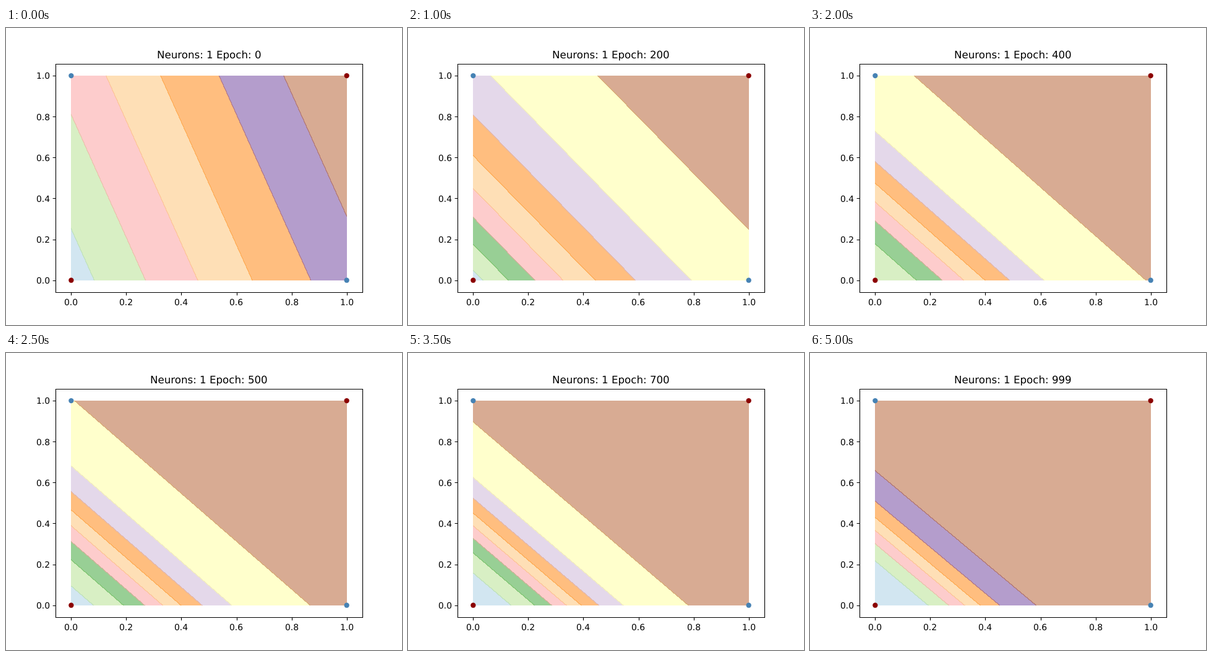
These frames come from a looping animation (640 by 480 pixels, 5500 ms). An HTML page with a canvas:

```html
<!DOCTYPE html>
<html lang="en">
<head>
<meta charset="utf-8">
<title>Decision surface</title>
<style>
html, body { margin: 0; width: 100%; height: 100%; overflow: hidden; background: #fff; }
canvas, svg { position: absolute; left: 0; top: 0; display: block; }
text { font: 13.89px "DejaVu Sans", sans-serif; fill: #000; text-rendering: geometricPrecision; }
#title { font-size: 16.67px; }
</style>
</head>
<body>
<canvas id="field" width="640" height="480"></canvas>
<svg id="plot" width="640" height="480" viewBox="0 0 640 480">
  <text id="title" y="49"></text>
</svg>
<script>
const STEP = 500, STEPS = 11;
const X0 = 105.35, XS = 445.3, Y0 = 407.7, YS = 330.6;
const LEFT = 105, RIGHT = 551, TOP = 77, BOTTOM = 408;
const PAIRED = ['#a6cee3', '#1f78b4', '#b2df8a', '#33a02c', '#fb9a99', '#e31a1c',
                '#fdbf6f', '#ff7f00', '#cab2d6', '#6a3d9a', '#ffff99', '#b15928'];

// Network: output = sigmoid(low + (high - low) * sigmoid((x + slant*y - mid) / width)).
// Training checkpoints, eased linearly: step, slant, low, high, width, mid
const KEYS = [
  [0, .333, -.745, .945, .977, .13],
  [1, .643, -3.9, .6, .549, -.483],
  [3, .813, -1.38, .413, .214, .246],
  [4, .841, -1.9, .44, .168, .277],
  [5, .855, -2.05, .455, .151, .278],
  [7, .871, -2.11, .455, .1255, .288],
  [10, .887, -2.66, .4, .108, .27]
];
const NICE = [1, 1.5, 2, 2.5, 3, 4, 5, 6, 8, 10];

const plot = document.getElementById('plot');
const title = document.getElementById('title');
const ctx = document.getElementById('field').getContext('2d');

const px = x => X0 + XS * x;
const py = y => Y0 - YS * y;
const sigmoid = z => 1 / (1 + Math.exp(-z));
const logit = p => Math.log(p / (1 - p));

function add(tag, attrs) {
  const node = document.createElementNS('http://www.w3.org/2000/svg', tag);
  for (const key in attrs) node.setAttribute(key, attrs[key]);
  return plot.appendChild(node);
}

// Text is centred on x, then starts on a whole pixel
function setText(node, label, x) {
  node.textContent = label;
  node.setAttribute('x', Math.round(x - node.getComputedTextLength() / 2));
}

function drawAxes() {
  let d = 'M80.5 58.5H576.5V427.5H80.5Z';
  for (let i = 0; i <= 5; i++) {
    const v = i / 5, x = px(v), y = py(v);
    d += `M${Math.round(x) + .5} 427.5v4.86M80.5 ${Math.round(y) + .5}h-4.86`;
    setText(add('text', { y: 448 }), v.toFixed(1), x);
    setText(add('text', { y: Math.round(y + 5.3) }), v.toFixed(1), 60);
  }
  add('path', { d, fill: 'none', stroke: '#000', 'stroke-width': 1.11 });
  for (const x of [0, 1])
    for (const y of [0, 1])
      add('circle', { cx: px(x), cy: py(y), r: 4.17, fill: x === y ? '#8b0000' : '#4682b4' });
}

function weightsAt(step) {
  const i = Math.max(1, KEYS.findIndex(key => key[0] >= step));
  const a = KEYS[i - 1], b = KEYS[i];
  const t = (step - a[0]) / (b[0] - a[0]);
  return a.map((v, n) => v + (b[n] - v) * t).slice(1);
}

// Round contour levels, at most eight intervals across the output range;
// returns where each contour meets y = 0
function contours([slant, low, high, width, mid]) {
  const output = s => sigmoid(low + (high - low) * sigmoid((s - mid) / width));
  const min = output(0), max = output(1 + slant);
  const gap = NICE.find(n => n / 100 >= (max - min) / 8) / 100;
  const cuts = [];
  for (let n = Math.floor(min / gap) + 1; n < Math.ceil(max / gap); n++) {
    const z = logit(n * gap);
    cuts.push(mid + width * Math.log((z - low) / (high - z)));
  }
  return cuts;
}

// Half-transparent bands cover every pixel they touch; the overlaps form the contour lines
function drawBands(weights) {
  const cuts = contours(weights), count = cuts.length + 1;
  const shift = row => weights[0] * (Y0 - row) / YS;
  ctx.clearRect(0, 0, 640, 480);
  ctx.globalAlpha = .5;
  for (let i = 0; i < count; i++) {
    ctx.fillStyle = PAIRED[Math.floor((i + .5) * 12 / count + 1e-6)];
    for (let row = TOP; row < BOTTOM; row++) {
      const from = i ? Math.max(LEFT, Math.floor(px(cuts[i - 1] - shift(row)))) : LEFT;
      const to = i < count - 1 ? Math.min(RIGHT, Math.ceil(px(cuts[i] - shift(row + 1)))) : RIGHT;
      if (to > from) ctx.fillRect(from, row, to - from, 1);
    }
  }
}

let shown = -1;
function tick() {
  const step = Math.floor(performance.now() / STEP) % STEPS;
  if (step !== shown) {
    shown = step;
    drawBands(weightsAt(step));
    setText(title, `Neurons: 1 Epoch: ${Math.min(step * 100, 999)}`, 328);
  }
  requestAnimationFrame(tick);
}

drawAxes();
tick();
</script>
</body>
</html>
```
